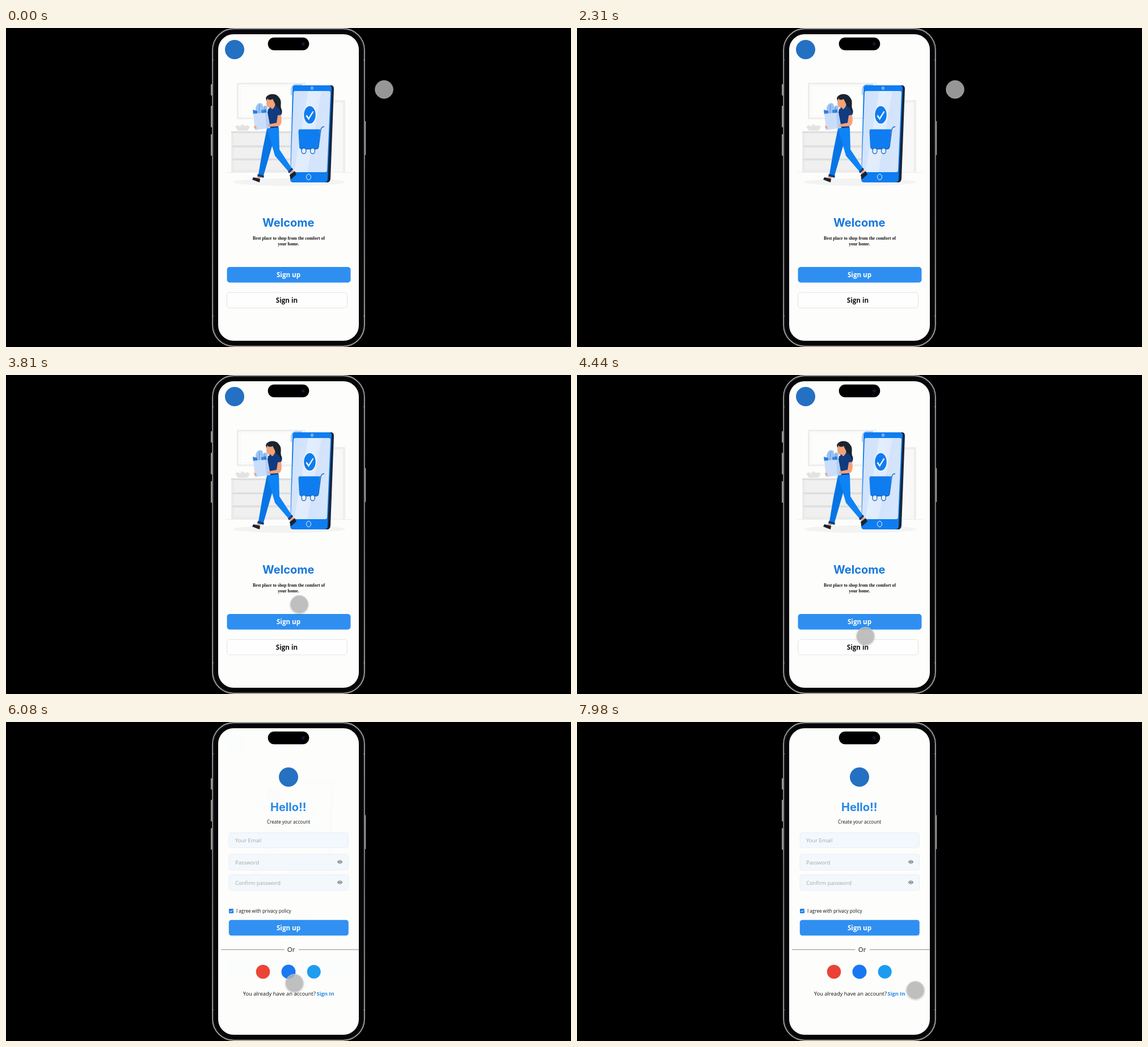
An HTML page for the animation above (8000 ms loop, 996x562 px).

```html
<!DOCTYPE html>
<html lang="en">
<head>
<meta charset="utf-8">
<title>Shopping app sign up</title>
<style>
  html, body { margin: 0; width: 100%; height: 100%; overflow: hidden; background: #000; }
  svg { display: block; width: 100vw; height: 100vh; }
  text { font-family: "Open Sans", sans-serif; fill: #111; }
  .mid { text-anchor: middle; }
  .title { font: 700 20px Inter, sans-serif; fill: #1679dc; }
  .lead { font: 700 7.8px "Liberation Serif", serif; }
  .label { font-size: 11.6px; font-weight: 700; }
  .small { font-size: 8.1px; }
  .hint { font-size: 9.4px; fill: #a3a6a9; }
  .note { font-size: 9.35px; }
  .link { font-weight: 700; fill: #2388e5; }
  .on-blue { fill: #fff; }
  .button { fill: #2f8ff1; }
  .field rect { fill: #f3f8fd; stroke: #e2ecf5; stroke-width: .8; }

  #welcome { animation: leave 8s ease-in-out infinite; }
  #signup { animation: enter 8s ease-in-out infinite; }
  #pointer { animation: point 8s ease-in-out infinite; }
  @keyframes leave { 0%, 70% { opacity: 1; } 76.5%, 100% { opacity: 0; } }
  @keyframes enter { 0%, 70% { opacity: 0; } 76.5%, 100% { opacity: 1; } }
  @keyframes point {
    0%, 35% { transform: translate(666.5px, 108.3px); }
    47.6% { transform: translate(517px, 404px); }
    53%, 84% { transform: translate(508.5px, 460px); }
    89.75% { transform: translate(502px, 456px); }
    98%, 100% { transform: translate(596.5px, 472.5px); }
  }
</style>
</head>
<body>
<svg viewBox="0 0 996 562" preserveAspectRatio="none">
  <defs>
    <linearGradient id="metal" x2="0" y2="1">
      <stop offset="0" stop-color="#a2a3a8"/>
      <stop offset=".5" stop-color="#7b7c80"/>
      <stop offset="1" stop-color="#aaa8a0"/>
    </linearGradient>
    <linearGradient id="glass" x2="1" y2=".35">
      <stop offset="0" stop-color="#cfe1fb"/>
      <stop offset=".38" stop-color="#d3e4fc"/>
      <stop offset=".4" stop-color="#e3eefd"/>
      <stop offset=".68" stop-color="#e0ebfd"/>
      <stop offset=".7" stop-color="#d2e3fb"/>
      <stop offset="1" stop-color="#d5e5fc"/>
    </linearGradient>
    <clipPath id="screen"><rect x="374" y="11" width="248" height="540" rx="27"/></clipPath>
    <filter id="soft" x="-30%" y="-30%" width="160%" height="160%">
      <feDropShadow dx="0" dy="1" stdDeviation="1.4" flood-color="#000" flood-opacity=".25"/>
    </filter>
    <g id="eye">
      <path d="M-4.7 0Q0-6.600 4.700 0Q0 6.600-4.700 0Z" fill="#777"/>
      <circle r="2.200" fill="#f3f8fd"/><circle r="1.300" fill="#666"/>
    </g>
  </defs>

  <rect width="996" height="562"/>

  <!-- Phone body -->
  <g fill="#99988f">
    <rect x="361" y="99" width="2.500" height="20" rx="1"/>
    <rect x="361" y="137" width="2.500" height="38" rx="1"/>
    <rect x="361" y="187" width="2.500" height="38" rx="1"/>
    <rect x="632" y="164" width="2.300" height="60" rx="1"/>
  </g>
  <rect x="364" y="1" width="268" height="560" rx="38" fill="#060608" stroke="url(#metal)" stroke-width="1.800"/>
  <rect x="366" y="3" width="264" height="556" rx="36" fill="none" stroke="#25262b"/>
  <path d="M364 56h2m264 0h2M364 507h2m264 0h2" stroke="#aaa"/>
  <rect x="374" y="11" width="248" height="540" rx="27" fill="#fdfdfc"/>

  <g clip-path="url(#screen)">
    <g id="welcome">
      <circle cx="403" cy="38" r="17" fill="#2470c2"/>

      <!-- Room -->
      <ellipse cx="499" cy="271.5" rx="99" ry="6.5" fill="#f3f3f3"/>
      <g fill="none" stroke="#ededed">
        <rect x="408.5" y="98" width="118" height="61" stroke-width="3"/>
        <path d="M413 102.500h109v52H413z" stroke="#f5f5f5"/>
        <path d="M388 254.500h222"/>
      </g>
      <path d="M574 127h24v127h-24z" fill="#eee"/>
      <path d="M574 131h20v123h-20z" fill="#f8f8f8"/>
      <path d="M397 182h106v72H397z" fill="#ebebeb"/>
      <path d="M397 182h106v3H397zM399 207h104v3H399zM399 230h104v3H399z" fill="#dedede"/>
      <path d="M402 186h98v20h-98zM402 211h98v18h-98zM402 234h98v16h-98z" fill="#f0f0f0"/>
      <path d="M404 174q5-5 9 0q3-8 8-1q6-4 9 2l-5 6h-16z" fill="#e3e3e3"/>

      <!-- Big phone -->
      <path d="M511 101h63q4 1 4 6l-6 159q-1 6-6 6h-60z" fill="#17263c"/>
      <path d="M510 101h59q5 0 5 5l-7 160q0 6-6 6h-55q-5 0-5-6l4-160q0-5 5-5z" fill="#0f7df0"/>
      <path d="M510 111h59q3 0 3 3l-6 137q0 3-4 3h-58q-2 0-2-3l5-137q0-3 3-3z" fill="url(#glass)"/>
      <path d="M503 118v-10q1-8 8-8h11" fill="none" stroke="#4d9bed"/>
      <g fill="none" stroke="#fff">
        <ellipse cx="539.5" cy="106" rx="1.700" ry="2.200"/>
        <ellipse cx="533.500" cy="262.500" rx="4" ry="5"/>
      </g>
      <ellipse cx="535.500" cy="153" rx="11.500" ry="17" fill="#fff"/>
      <ellipse cx="535.500" cy="153" rx="10.300" ry="15.500" fill="#0f7df0"/>
      <path d="M529.500 154l4 6l8-13" fill="none" stroke="#fff" stroke-width="2.300"/>
      <path d="M518 178.500h36l-3 32q0 3-4 3h-26q-4 0-4-4l-1.500-27q0-4 2.500-4z" fill="#0f7df0"/>
      <g fill="none" stroke="#1766bd" stroke-width="1.300">
        <path d="M520 213h27q3 0 4-4l4-30q1-5 6-5"/>
        <g fill="#e5effd"><ellipse cx="525" cy="216.500" rx="4" ry="5"/><ellipse cx="540.500" cy="216.500" rx="4" ry="5"/></g>
      </g>

      <!-- Shopper -->
      <path d="M458 124C460 115 476 114 481 122C488 129 482 137 486 144C489 154 480 157 474 150L463 139Z" fill="#182431"/>
      <path d="M460 126q2-5 8-4q6 1 6 9l1 10l-8 4l-1-5q-7 1-7-8z" fill="#f3a27b"/>
      <path d="M461 125q5 3 9 0l4 8q3-8-2-13q-8-2-11 5z" fill="#182431"/>
      <path d="M462 143l5-3q2 7 7-3q9 3 12 15l-5 4l-1 20l-18 2l-2-24z" fill="#113b80"/>
      <path d="M452 258l-5 9h-7l5-9zM498 251l8 11l4-6l-6-8z" fill="#f3a27b"/>
      <path d="M460 177l14-1l-5 32l-15 52l-9-2l7-42z" fill="#0875e5"/>
      <path d="M460 177l21-2l1 39l23 35l-6 5l-25-29l-7-25z" fill="#0d83f6"/>
      <path d="M444 257l11 3l-1 4l-11-3zM497 253l7-7l2 3l-7 7z" fill="#163c70"/>
      <path d="M436 263l5 1l7 2l-1 6q-6-2-13-5zM500 259l9-7l3 6l-9 8q-3 0-2-3z" fill="#182431"/>
      <path d="M442 151q-5-12 3-18q8-3 8 6q4-5 8 0l-1 12z" fill="#9cc3f4"/>
      <path d="M435 144l8 2v8l-7-1zM450 145l8-2l2 8h-9z" fill="#287fdc"/>
      <path d="M446 150l1-15m5 15l5-11" stroke="#5b98de"/>
      <path d="M436 151l25-2l5 27l-27 4z" fill="#cadefb"/>
      <path d="M457 149l4 0l5 27l-7 1z" fill="#b4cef5"/>
      <path d="M479 154l6-1q3 18-5 20l-17 1l-1-4l15-3zM437 172l4 1l1 5l-4-1z" fill="#f3a27b"/>

      <text class="title mid" x="497.700" y="350">Welcome</text>
      <text class="lead mid" x="498.500" y="373">Best place to shop from the comfort of</text>
      <text class="lead mid" x="498" y="383">your home.</text>
      <rect class="button" x="389.500" y="421" width="218" height="27.500" rx="5"/>
      <text class="label mid on-blue" x="498" y="439">Sign up</text>
      <rect x="389.500" y="466" width="212" height="27" rx="5" fill="#fefefe" stroke="#dcdfe2" stroke-width=".9"/>
      <text class="label mid" x="495" y="483.500">Sign in</text>
    </g>

    <g id="signup">
      <circle cx="498" cy="97" r="17" fill="#2470c2"/>
      <text class="title mid" x="497.700" y="157" style="fill:#2588e8">Hello!!</text>
      <text class="small mid" x="498" y="179">Create your account</text>
      <g class="field">
        <rect x="393" y="195" width="210.500" height="26.500" rx="4"/>
        <rect x="393" y="233" width="210.500" height="28" rx="4"/>
        <rect x="393" y="269" width="210.500" height="27.500" rx="4"/>
        <text class="hint" x="404" y="212.300">Your Email</text>
        <text class="hint" x="404" y="250.800">Password</text>
        <text class="hint" x="404" y="286.500">Confirm password</text>
        <use href="#eye" x="588.500" y="246.500"/>
        <use href="#eye" x="588.500" y="282.500"/>
      </g>
      <rect x="393" y="329" width="8" height="8" rx="1" fill="#1e82e8"/>
      <path d="M394.800 333l1.700 1.800l3-3.600" fill="none" stroke="#fff"/>
      <text class="small" x="406" y="336">I agree with privacy policy</text>
      <rect class="button" x="392.800" y="348.700" width="211" height="27.600" rx="4.500"/>
      <text class="label mid on-blue" x="498" y="366.700">Sign up</text>
      <path d="M379 401h111.500M516 401h106" stroke="#858585"/>
      <text class="mid" x="502.700" y="405" font-size="11.500">Or</text>
      <circle cx="453" cy="440" r="12.300" fill="#ea4335"/>
      <circle cx="498" cy="440" r="12.500" fill="#1877f2"/>
      <circle cx="542.700" cy="440" r="12" fill="#1d9bf0"/>
      <text class="note" x="417.700" y="481.500">You already have an account?</text>
      <text class="note link" x="547.500" y="481.500">Sign In</text>
    </g>
  </g>

  <rect x="461.700" y="16.800" width="72.600" height="22.400" rx="11.200"/>
  <circle cx="524" cy="28" r="3.500" fill="#0c0d22"/>
  <circle cx="524" cy="28" r="1.500" fill="#1c1f4d"/>

  <g id="pointer">
    <circle r="15.700" fill="#b6b6b6" fill-opacity=".8" stroke="#d0d0d0" stroke-opacity=".8" filter="url(#soft)"/>
  </g>
</svg>
</body>
</html>
```
